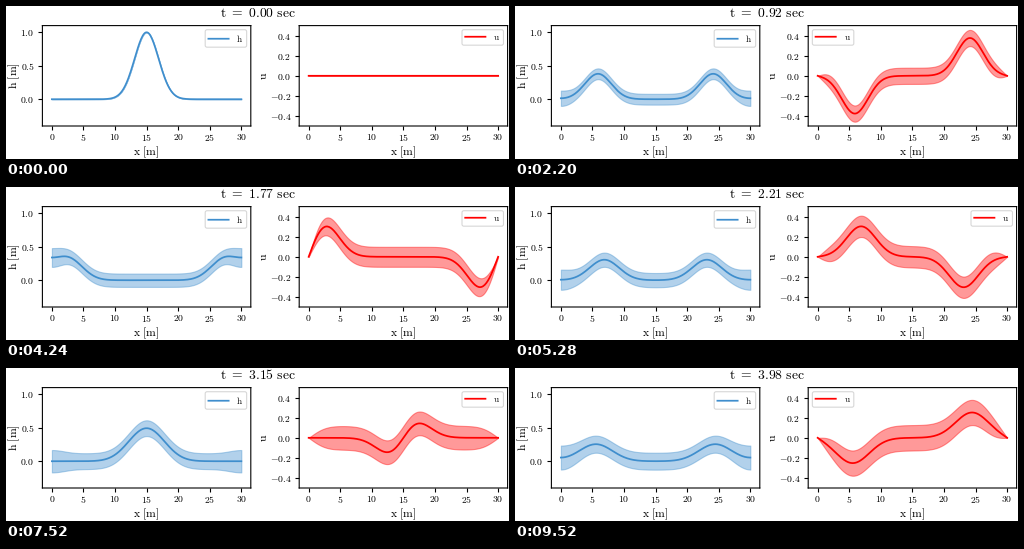
A matplotlib script that plays this animation: 503x153 px, repeating every 9560 ms.

```python
import numpy as np
import matplotlib.pyplot as plt
from matplotlib.animation import FuncAnimation

W, H, DPI = 503, 153, 100
PX = 72 / DPI                     # points per pixel
FRAMES, T_END = 239, 4.0
LENGTH, MID = 30.0, 15.0
SPEED = np.sqrt(9.81 * 10)        # gravity wave speed over 10 m of water
BLUE, RED = '#3f8ecd', 'red'
TICK = 9.7 * PX

plt.rcParams.update({
    'mathtext.fontset': 'cm',
    'path.snap': False,
    'axes.linewidth': 1.1 * PX,
    'xtick.major.width': 1.1 * PX, 'ytick.major.width': 1.1 * PX,
    'xtick.major.size': 4 * PX, 'ytick.major.size': 4 * PX,
    'xtick.major.pad': 1.8 * PX, 'ytick.major.pad': 4 * PX,
    'patch.linewidth': 1.1 * PX,
    'legend.fontsize': 9.2 * PX,
    'legend.borderpad': 0.35, 'legend.borderaxespad': 0.45,
    'legend.handlelength': 2.2, 'legend.handletextpad': 0.85,
})

x = np.linspace(0, LENGTH, 241)


def roman(text):
    return r'$\mathrm{' + text.replace('=', '{=}').replace(' ', r'\ ') + '}$'


def waves(t):
    """Mean height and velocity: two travelling bumps reflected at the walls."""
    var = 3.6 + 0.83 * t
    amp = 0.5 * (1 + t)**-0.42
    right = np.zeros_like(x)
    left = np.zeros_like(x)
    for m in range(-2, 3):
        s = x - MID - LENGTH * m
        right += amp * np.exp(-(s - SPEED * t)**2 / (2 * var))
        left += amp * np.exp(-(s + SPEED * t)**2 / (2 * var))
    return right + left, 0.99 * (right - left)


def bands(t):
    """Half widths of the uncertainty bands, doubled variance or none at walls."""
    var = 0.0546**2 * (np.sqrt(1 + 10 * t) - 1)
    reach = 1.3 + 0.7 * np.sqrt(t)
    wall = np.exp(-(x / reach)**2) + np.exp(-((LENGTH - x) / reach)**2)
    return np.sqrt(var * (1 + wall)), np.sqrt(var * np.clip(1 - wall, 0, None))


def outline(y, w):
    return np.column_stack([np.r_[x, x[::-1]], np.r_[y - w, (y + w)[::-1]]])


fig = plt.figure(figsize=(W / DPI, H / DPI), dpi=DPI, facecolor='white')


def label(px, py, text, size, **kw):
    return fig.text(px / W, 1 - py / H, roman(text), fontsize=size * PX,
                    ha='center', va='center', **kw)


def panel(left, ylim, yticks, name, color):
    ax = fig.add_axes([left / W, 1 - 120 / H, 208.4 / W, 100.4 / H])
    ax.set_xlim(-1.5, 31.5)
    ax.set_ylim(*ylim)
    xticks = range(0, 31, 5)
    ax.set_xticks(xticks, [roman(str(v)) for v in xticks], fontsize=TICK)
    ax.set_yticks(yticks, [roman(f'{v:.1f}') for v in yticks], fontsize=TICK)
    band = ax.fill_between(x, 0 * x, 0 * x, color=color, alpha=0.4)
    line, = ax.plot(x, 0 * x, color=color, lw=1.75 * PX, label=roman(name))
    ax.legend(loc='best')
    label(left + 104.2, 146, 'x [m]', 11.6)
    return line, band


h_line, h_band = panel(36.4, (-0.4, 1.1), [0.0, 0.5, 1.0], 'h', BLUE)
u_line, u_band = panel(293.2, (-0.5, 0.5), [-0.4, -0.2, 0.0, 0.2, 0.4], 'u', RED)
label(8, 70, 'h [m]', 11.6, rotation=90)
label(257.5, 70, 'u', 11.6, rotation=90)
title = label(251.5, 7, 't = 0.00 sec', 13.6)


def update(i):
    t = i * T_END / FRAMES
    parts = zip((h_line, u_line), (h_band, u_band), waves(t), bands(t))
    for line, band, y, w in parts:
        line.set_ydata(y)
        band.set_verts([outline(y, w)])
    title.set_text(roman(f't = {t:.2f} sec'))
    return h_line, u_line, h_band, u_band, title


anim = FuncAnimation(fig, update, frames=FRAMES, interval=40,
                     repeat=True, repeat_delay=0, blit=False)
plt.show()
```
